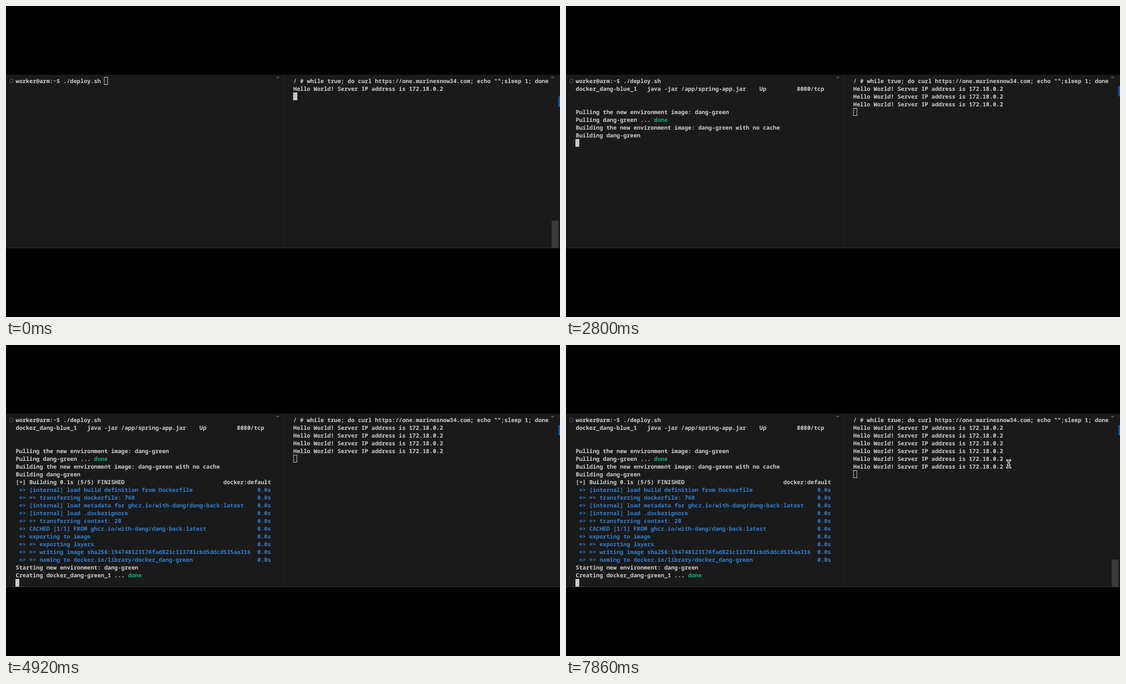
Recreate the animation shown at these times as an HTML page. Size 998 by 561 pixels, loop 8000 ms.

```html
<!DOCTYPE html>
<html lang="en">
<head>
<meta charset="utf-8">
<title>Deploy terminal</title>
<style>
html, body { margin: 0; width: 100%; height: 100%; overflow: hidden; background: #000; }
#stage { position: relative; width: 998px; height: 561px; overflow: hidden; }
#stage * { position: absolute; box-sizing: border-box; }
#panel { left: 0; top: 124px; width: 998px; height: 313px; background: #1a1a1a; border-bottom: 1px solid #2b2b24; }
#divider { left: 500px; top: 124px; width: 1px; height: 312px; background: #262626; }
pre {
  margin: 0; top: 128px; color: #cfcfca;
  font: 600 10.227px/14px "Noto Sans Mono", "DejaVu Sans Mono", monospace;
  font-variant-ligatures: none; text-rendering: geometricPrecision;
}
#stage pre span { position: static; }
#left { left: 17.5px; }
#right { left: 517.5px; }
.blue { color: #317fd0; }
.green { color: #12b273; }
.cursor { width: 7px; height: 14px; border: 1px solid #c8c8c4; }
.focus { background: #c8c8c4; }
.bar { width: 12px; background: #3a3a3a; }
#barL { left: 488px; top: 370px; height: 66px; }
#barR { left: 983px; top: 387px; height: 49px; }
.dash { top: 128px; width: 5px; height: 2px; background: #555; }
#tab { left: 995px; width: 3px; height: 19px; background: #1f5799; }
#dot { left: 6px; top: 131px; width: 8px; height: 8px; border: 1px solid #58586a; border-radius: 50%; }
#mouse { left: 0; top: 0; }
</style>
</head>
<body>
<div id="stage">
  <div id="panel"></div>
  <div id="divider"></div>
  <div class="bar" id="barL"></div>
  <div class="bar" id="barR"></div>
  <div class="dash" style="left:487px"></div>
  <div class="dash" style="left:982px"></div>
  <div id="tab"></div>
  <div id="dot"></div>
  <pre id="left"></pre>
  <pre id="right"></pre>
  <div class="cursor" id="curL"></div>
  <div class="cursor" id="curR"></div>
  <svg id="mouse" width="12" height="18" viewBox="-6 -9 12 18" fill="none" stroke-linecap="round">
    <path id="beam" d="M-3-6.5Q0-6.5 0-4.5Q0-6.5 3-6.5M0-4.5V4.5M-3 6.5Q0 6.5 0 4.5Q0 6.5 3 6.5M-1.5 1.5H1.5" stroke="#eee" stroke-width="3.2"/>
    <use href="#beam"/>
    <path d="M-3-6.5Q0-6.5 0-4.5Q0-6.5 3-6.5M0-4.5V4.5M-3 6.5Q0 6.5 0 4.5Q0 6.5 3 6.5M-1.5 1.5H1.5" stroke="#111" stroke-width="1.1"/>
  </svg>
</div>
<script>
const LOOP = 8000, CHAR = 6.136, ROW = 14, TOP = 128;
const FOCUS = 500, ENTER = 900, BUILT = 3100, HOVER = 5500;
const $ = id => document.getElementById(id);
const clamp = v => Math.max(0, Math.min(1, v));
const ramp = (t, a, b) => clamp((t - a) / (b - a));
const paint = (cls, s) => `<span class="${cls}">${s}</span>`;
const step = s => [BUILT, paint("blue", (" => " + s).padEnd(71) + "0.0s")];

// Each row: time it appears, markup, optional time its "done" appears
const rows = [
  [0, "worker@arm:~$ ./deploy.sh "],
  [1800, "docker_dang-blue_1   java -jar /app/spring-app.jar    Up         8080/tcp"],
  [1800, ""],
  [1800, ""],
  [1900, "Pulling the new environment image: dang-green"],
  [2200, "Pulling dang-green ... ", 2400],
  [2550, "Building the new environment image: dang-green with no cache"],
  [2750, "Building dang-green"],
  [BUILT, "[+] Building 0.1s (5/5) FINISHED".padEnd(61) + "docker:default"],
  step("[internal] load build definition from Dockerfile"),
  step("=> transferring dockerfile: 76B"),
  step("[internal] load metadata for ghcr.io/with-dang/dang-back:latest"),
  step("[internal] load .dockerignore"),
  step("=> transferring context: 2B"),
  step("CACHED [1/1] FROM ghcr.io/with-dang/dang-back:latest"),
  step("exporting to image"),
  step("=> exporting layers"),
  step("=> writing image sha256:194748123176fad821c113781cbd5ddcd535aa316"),
  step("=> naming to docker.io/library/docker_dang-green"),
  [3200, "Starting new environment: dang-green"],
  [3500, "Creating docker_dang-green_1 ... ", 4300]
];
const command = '/ # while true; do curl https://one.marinesnow34.com; echo "";sleep 1; done';
const reply = "\nHello World! Server IP address is 172.18.0.2";

function setText(el, html) {
  if (el.shown !== html) el.innerHTML = el.shown = html;
}

function place(el, x, y) {
  el.style.transform = `translate(${x}px, ${y}px)`;
}

function draw(t) {
  const shown = rows.filter(r => r[0] <= t);
  setText($("left"), shown.map(r => r[1] + (t >= r[2] ? paint("green", "done") : "")).join("\n"));
  const count = t < 1210 ? 1 : 2 + Math.floor((t - 1210) / 1430);
  setText($("right"), command + reply.repeat(count));

  const typed = t < ENTER;
  place($("curL"), typed ? 17 + 26 * CHAR : 17, TOP + (typed ? 0 : shown.length * ROW));
  place($("curR"), 517.5, TOP + (count + 1) * ROW);
  $("curL").classList.toggle("focus", t >= FOCUS);
  $("curR").classList.toggle("focus", t < FOCUS);
  place($("tab"), 0, t < FOCUS ? 163 : 144);

  $("barL").style.opacity = ramp(t, 400, 500) * (1 - ramp(t, 1500, 2100));
  $("barR").style.opacity = t < HOVER - 200 ? 1 - ramp(t, 400, 1000) : ramp(t, HOVER, HOVER + 100);
  $("mouse").style.opacity = t >= HOVER ? 1 : 0;
  place($("mouse"), 788.5 + 3 * ramp(t, 6900, 7300), 205.5);
}

const start = performance.now();
function tick() {
  draw((performance.now() - start) % LOOP);
  requestAnimationFrame(tick);
}
tick();
</script>
</body>
</html>
```
